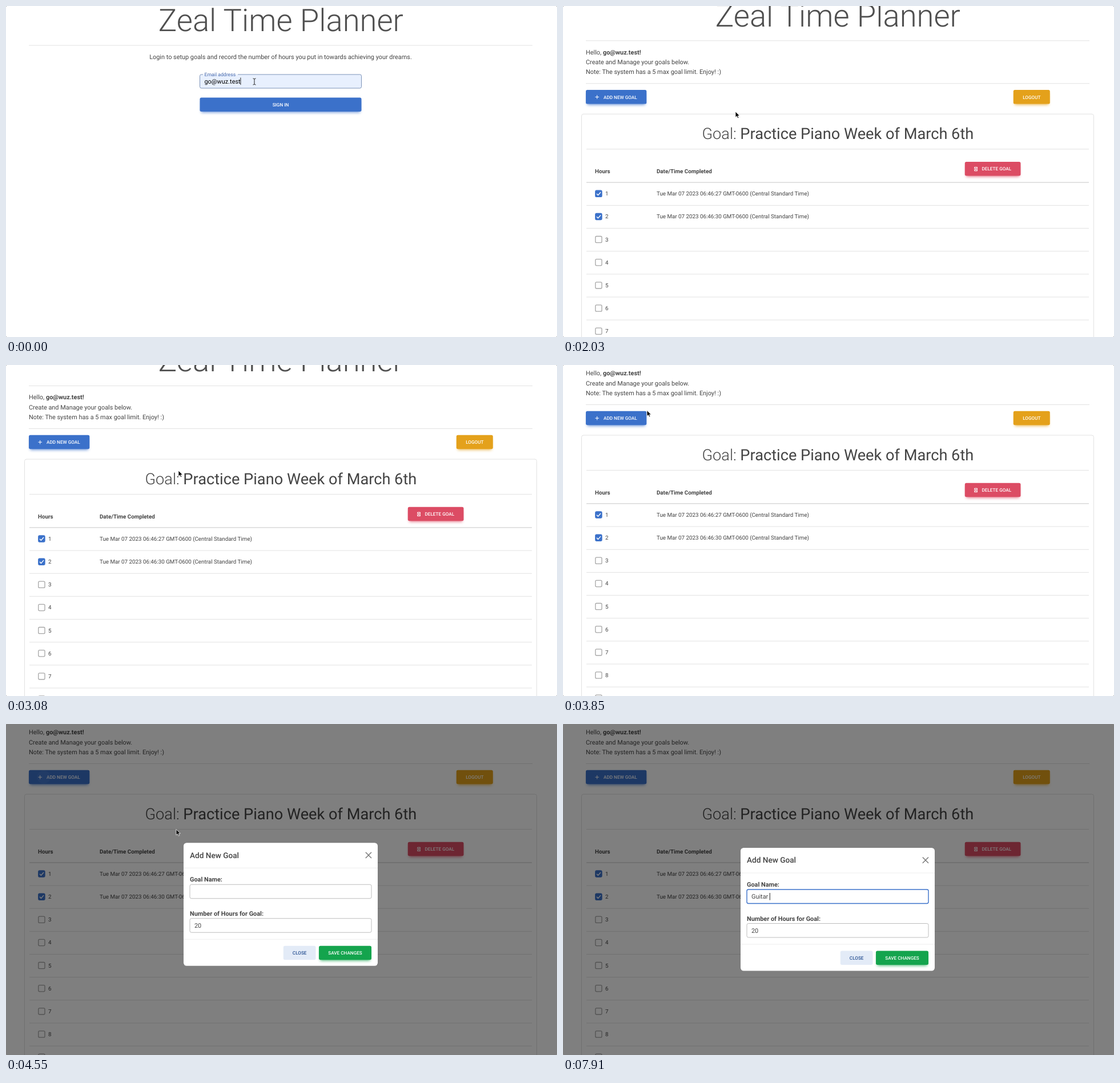
An HTML page that plays this animation: 965 by 580 pixels, repeating every 8 s.

```html
<!DOCTYPE html>
<html lang="en">
<head>
<meta charset="utf-8">
<title>Zeal Time Planner</title>
<style>
  html, body { margin: 0; width: 100%; height: 100%; overflow: hidden; background: #fff; }
  svg { display: block; font-family: Roboto, sans-serif; text-rendering: geometricPrecision; }
  text { white-space: pre; }
  .shadow { filter: blur(2.6px); opacity: .75; }
</style>
</head>
<body>
<svg id="stage" width="965" height="580" viewBox="0 0 965 580"></svg>
<script>
const BLUE = '#3b71ca', HOVER = '#386bc0', INK = '#444', RULE = '#e2e2e2';
const EMAIL = 'go@wuz.test', LOOP = 8000, STEP = 70;

// y is the middle of the capital letters
const text = (x, y, content, size = 10.9, attrs = '') =>
  `<text x="${x}" y="${y + size * .355}" font-size="${size}" fill="${INK}" ${attrs}>${content}</text>`;
const rect = (x, y, w, h, fill, attrs = '') =>
  `<rect x="${x}" y="${y}" width="${w}" height="${h}" fill="${fill}" ${attrs}/>`;
const rule = (y, x1 = 40, x2 = 922, color = RULE, width = 1) =>
  `<path d="M${x1} ${y}H${x2}" stroke="${color}" stroke-width="${width}"/>`;
const button = (id, x, y, w, fill, label, labelX = x + w / 2, attrs = 'text-anchor="middle"', color = '#fff') =>
  (color === '#fff' ? rect(x + 2.5, y + 5.5, w - 5, 20.5, fill, 'class="shadow"') : '') +
  rect(x, y, w, 24.5, fill, `id="${id}" rx="2.7"`) +
  text(labelX, y + 12.6, label, 8.17, `${attrs} font-weight="500" style="fill:${color}"`);
const field = (id, y) =>
  rect(322, y, 318, 24.5, '#fff', `id="${id}" rx="2.7" stroke="#bdbdbd"`);
const caret = id => `<path id="${id}" stroke="#222"/>`;

const dates = ['27', '30'].map(s => `Tue Mar 07 2023 06:46:${s} GMT-0600 (Central Standard Time)`);
const row = i => {
  const y = 337 + 40.15 * i, done = i < dates.length;
  return rect(56.8, y - 5.6, 11.2, 11.2, done ? BLUE : '#fff',
      `rx="2" stroke="${done ? BLUE : '#a6a6a6'}" stroke-width="1.3"`) +
    (done ? `<path d="M59 ${y + .2}l2.4 2.5 4.6-5.2" fill="none" stroke="#fff" stroke-width="1.4"/>` : '') +
    text(74, y, i + 1, 9.8) + (done ? text(164, y, dates[i], 9.8) : '') + rule(y + 20.6, 41, 921);
};

const login =
  text(481, 89, 'Login to setup goals and record the number of hours you put in towards achieving your dreams.', 10.9, 'text-anchor="middle"') +
  rect(339.5, 120, 283, 24, '#e8f0fe', 'rx="2.7"') +
  '<path d="M345 120H342.2a2.7 2.7 0 0 0-2.7 2.7v18.6a2.7 2.7 0 0 0 2.7 2.7H619.8a2.7 2.7 0 0 0 2.7-2.7v-18.6a2.7 2.7 0 0 0-2.7-2.7H406" fill="none" stroke="#7d93b8"/>' +
  text(347.5, 120, 'Email address', 8.7, 'style="fill:#4a6cae"') +
  text(347.5, 131.8, EMAIL, 10.9, 'id="email" style="fill:#000"') + caret('emailCaret') +
  button('signIn', 339.5, 160.5, 283, BLUE, 'SIGN IN');

const goals =
  text(40, 89, `Hello, <tspan font-weight="700">${EMAIL}!</tspan>`) +
  text(40, 106.3, 'Create and Manage your goals below.') +
  text(40, 123.7, 'Note: The system has a 5 max goal limit. Enjoy! :)') +
  rule(144) +
  button('add', 40, 155.3, 106.3, BLUE, 'ADD NEW GOAL', 71, '') +
  '<circle id="ripple" cx="66" cy="167.5" r="11.5" fill="#7ea4e6"/>' +
  '<path d="M56.4 167.7h6.6m-3.3-3.3v6.6" stroke="#fff"/>' +
  button('logout', 788.8, 155.3, 64, '#e4a11b', 'LOGOUT') +
  rect(32.5, 197.5, 897, 900, 'none', `rx="3.5" stroke="${RULE}"`) +
  text(481.4, 231.5, 'Goal: <tspan font-weight="400">Practice Piano Week of March 6th</tspan>', 27.2,
    'text-anchor="middle" font-weight="300"') +
  rule(259, 41, 921) +
  text(56, 298, 'Hours', 9.8, 'font-weight="700"') +
  text(164, 298, 'Date/Time Completed', 9.8, 'font-weight="700"') +
  button('delete', 703.8, 281.2, 97.7, '#dc4c64', 'DELETE GOAL', 733.5, '') +
  '<path d="M720.8 290.6h4.6v6.6h-4.6zl4.6 6.6m0-6.6l-4.6 6.6" fill="none" stroke="#fff" stroke-width=".9"/>' +
  rule(317.4, 41, 921, '#d2d2d2', 1.3) +
  Array.from({ length: 10 }, (_, i) => row(i)).join('');

const modal =
  rect(311, 217, 340, 215.5, '#fff', 'rx="5.4"') +
  text(322, 238.6, 'Add New Goal', 13.6, 'font-weight="500"') +
  '<path d="M629.8 233.6l10.2 10.2m0-10.2l-10.2 10.2" stroke="#777" stroke-width="1.4"/>' +
  rule(261, 311, 651, '#eee') + rule(386, 311, 651, '#eee') +
  text(322, 281.2, 'Goal Name:', 10.9, 'font-weight="700"') + field('nameField', 290) +
  text(330, 302.3, '', 10.9, 'id="goalName"') + caret('nameCaret') +
  text(322, 340.8, 'Number of Hours for Goal:', 10.9, 'font-weight="700"') + field('hoursField', 349.5) +
  text(330, 361.9, '20') +
  button('close', 485.8, 397.5, 56.7, '#e3ebf7', 'CLOSE', undefined, undefined, '#285192') +
  button('save', 548, 397.5, 92, '#14a44d', 'SAVE CHANGES');

const cursors =
  '<path id="arrow" d="M0 0V10.2L2.4 8 4 11.6 5.8 10.8 4.2 7.4H7.4Z" fill="#000" stroke="#fff" stroke-width=".8"/>' +
  '<path id="beam" d="M-2.5-5.5Q0-5.5 0-4V4Q0 5.5-2.5 5.5M2.5-5.5Q0-5.5 0-4M0 4Q0 5.5 2.5 5.5" fill="none" stroke="#222"/>' +
  '<path id="hand" d="M-1 0Q0-1 1 0V4L5 5Q6.5 5.5 6 7.5L5 11H-.5L-4 6.5Q-3.5 5-1 7Z" fill="#fff" stroke="#000" stroke-width=".9"/>';

const stage = document.getElementById('stage');
stage.innerHTML =
  `<g id="page">${text(481.4, 24.5, 'Zeal Time Planner', 54.4, 'text-anchor="middle" font-weight="300" style="fill:#4f4f4f"')}${rule(69)}` +
  `<g id="login">${login}</g><g id="goals">${goals}</g></g>` +
  rect(0, 0, 965, 580, '#000', 'id="backdrop"') +
  `<g id="modal">${modal}</g><g id="cursor">${cursors}</g>` +
  '<path d="M0 0h1v1h-1zM964 0h1v1h-1zM0 579h1v1h-1zM964 579h1v1h-1z" fill="#999"/>';

const $ = id => document.getElementById(id);
const set = (id, attrs) => Object.entries(attrs).forEach(([k, v]) => $(id).setAttribute(k, v));
const show = (id, on) => set(id, { visibility: on ? 'inherit' : 'hidden' });
const ramp = (t, start, length) => Math.min(1, Math.max(0, (t - start) / length));

// Eased position along [time, ...values] keys
function track(keys, t) {
  const next = keys.findIndex(k => k[0] > t);
  if (next < 1) return (next ? keys[keys.length - 1] : keys[0]).slice(1);
  const [a, b] = [keys[next - 1], keys[next]];
  const p = ramp(t, a[0], b[0] - a[0]), e = p * p * (3 - 2 * p);
  return a.slice(1).map((v, i) => v + (b[i + 1] - v) * e);
}

const SCROLL = [[1890, 0], [2450, 52.5], [3080, 32.5], [3570, 74.5]];
const POINTER = [[0, 435, 132.5], [350, 433, 175], [1330, 433, 175], [1610, 302, 185], [3570, 302, 185],
  [3850, 147, 79.5], [4060, 66, 93], [4270, 66, 93], [4550, 298, 184.5], [4760, 298, 184.5], [5880, 346, 302.5]];
const TYPED = [[6720, 'G'], [7000, 'u'], [7140, 'i'], [7490, 't'], [7630, 'a'], [7700, 'r'], [7910, ' ']];
const SIGNED_IN = 700, ADD_CLICK = 4200, FOCUS = 6090;

function placeCaret(id, textId, x, y, on) {
  set(id, { d: `M${x + $(textId).getComputedTextLength() + .3} ${y - 6.3}v12.6` });
  show(id, on);
}

function draw(t) {
  const signedIn = t >= SIGNED_IN;
  show('login', !signedIn);
  show('goals', signedIn);
  set('page', { transform: `translate(0 ${-track(SCROLL, t)[0]})` });
  placeCaret('emailCaret', 'email', 347.5, 131.8, t < 490);

  const [x, y] = track(POINTER, t);
  const onSignIn = !signedIn && y > 160;
  const onAdd = t > 3640 && t < 4480 && x < 146 && y > 81;
  const inField = !signedIn && y < 144 || x > 322 && y > 290;
  set('signIn', { fill: onSignIn ? HOVER : BLUE });
  set('add', { fill: onAdd ? HOVER : BLUE });
  set('ripple', { opacity: t < ADD_CLICK ? 0 : .4 * (1 - ramp(t, ADD_CLICK, 500)) });

  set('backdrop', { opacity: .5 * ramp(t, 4220, 150) });
  set('modal', {
    opacity: ramp(t, 4385, 150),
    transform: `translate(0 ${-34 * (1 - ramp(t, 4385, 300)) ** 1.7})`
  });
  const focused = t >= FOCUS;
  set('nameField', { stroke: focused ? BLUE : '#bdbdbd', 'stroke-width': focused ? 1.4 : 1 });
  $('goalName').textContent = TYPED.filter(k => k[0] <= t).map(k => k[1]).join('');
  placeCaret('nameCaret', 'goalName', 330, 302.3, focused);

  set('cursor', { transform: `translate(${x} ${y})` });
  show('cursor', t < TYPED[0][0]);
  show('beam', inField);
  show('hand', onSignIn || onAdd);
  show('arrow', !inField && !onSignIn && !onAdd);
}

function frame() {
  const t = performance.now() % LOOP;
  draw(Math.floor(t / STEP) * STEP);
  requestAnimationFrame(frame);
}
frame();
</script>
</body>
</html>
```
